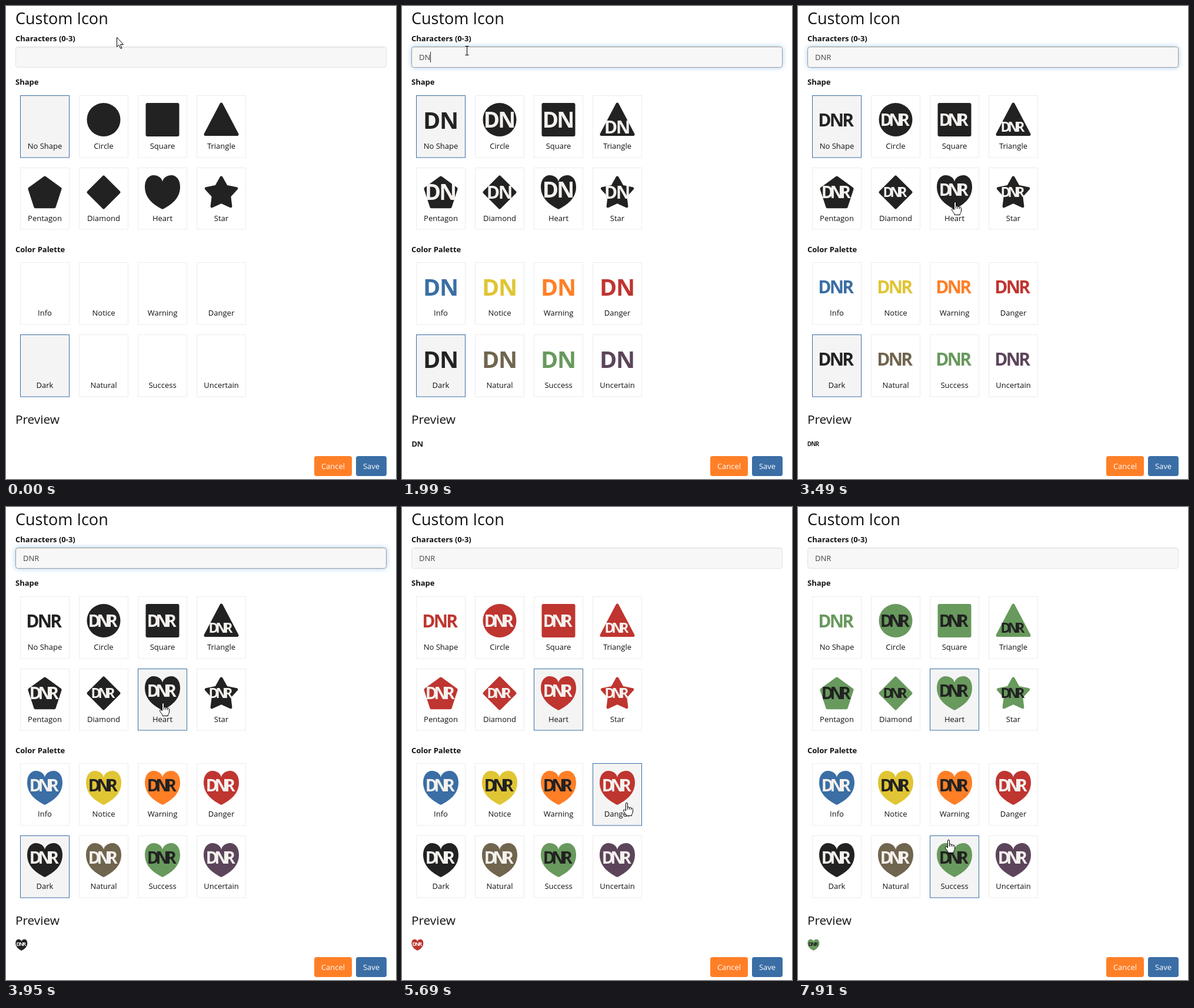
Write an HTML page that moves like this. It is 663x805 px and loops after 8 s.

```html
<!DOCTYPE html>
<html lang="en">
<head>
<meta charset="utf-8">
<title>Custom Icon</title>
<style>
  html, body { margin: 0; width: 100%; height: 100%; overflow: hidden; background: #fff; }
  svg { display: block; font: 13px "Open Sans", sans-serif; fill: #111; }
  .mid { text-anchor: middle; }
  .bold { font-weight: 700; }
</style>
</head>
<body>
<svg width="663" height="805" viewBox="0 0 663 805">
  <g id="scene"></g>
  <g id="cursor" stroke="#000" fill="#fff"></g>
</svg>
<script>
const LOOP = 8000;

// Regular polygon, or a star when the inner radius differs; corners rounded by the stroke.
function polygon(count, radius, inner, cy) {
  const points = [];
  for (let i = 0; i < count * 2; i++) {
    if (i % 2 && !inner) continue;
    const a = i * Math.PI / count, r = i % 2 ? inner : radius;
    points.push((r * Math.sin(a)).toFixed(2) + "," + (cy - r * Math.cos(a)).toFixed(2));
  }
  return rounded(points.join(" "));
}
const rounded = points => `<polygon points="${points}" stroke-width="5" stroke-linejoin="round"/>`;

const shapes = [
  { name: "No Shape", art: "", size: 30, spacing: -2.7, dy: 0.5 },
  { name: "Circle", art: '<circle cy="-.5" r="28.5" stroke="none"/>', size: 28, spacing: -6, dy: 0 },
  { name: "Square", art: '<rect x="-28.5" y="-29" width="57" height="57" rx="3" stroke="none"/>', size: 28, spacing: -6, dy: 0 },
  { name: "Triangle", art: rounded("0,-27 27,24.5 -27,24.5"), size: 23, spacing: -5, dy: 12 },
  { name: "Pentagon", art: polygon(5, 27.5, 0, 2.5), size: 28, spacing: -6, dy: 0 },
  { name: "Diamond", art: polygon(4, 26, 0, 0), size: 23, spacing: -5, dy: 0 },
  { name: "Heart", art: '<path d="M0 29C-14 22-30 11-30-9C-30-21-24-29-15-29C-7-29-1-24 0-18C1-24 7-29 15-29C24-29 30-21 30-9C30 11 14 22 0 29Z" stroke="none"/>', size: 28, spacing: -6, dy: -4 },
  { name: "Star", art: polygon(5, 27, 14.5, 2), size: 23, spacing: -5, dy: 0 }
];

const LIGHT = "#f4f1ee", DARK = "#222";
const colors = [
  { name: "Info", fill: "#3a6ea5", ink: LIGHT },
  { name: "Notice", fill: "#e0c534", ink: DARK },
  { name: "Warning", fill: "#ff7f27", ink: DARK },
  { name: "Danger", fill: "#bf3530", ink: LIGHT },
  { name: "Dark", fill: DARK, ink: LIGHT },
  { name: "Natural", fill: "#70654e", ink: LIGHT },
  { name: "Success", fill: "#68995d", ink: DARK },
  { name: "Uncertain", fill: "#5c455a", ink: LIGHT }
];

const shapeTops = [152, 275], colorTops = [436, 559];
const place = (i, tops) => ({ x: 24 + 100 * (i % 4), y: tops[i >> 2], h: tops[i >> 2] === 275 ? 105 : 106 });
const cards = [...shapes.map((_, i) => place(i, shapeTops)), ...colors.map((_, i) => place(i, colorTops))];

const label = (x, y, text, attrs = "") => `<text x="${x}" y="${y}" ${attrs}>${text}</text>`;

function icon(shape, color, text, x, y, scale = 1) {
  const n = text.length;
  const size = shape.size * [1, 1.53, 1.32, 1][n];
  const spacing = n === 3 ? shape.spacing : n === 2 ? shape.spacing / 2 : 0;
  const tx = spacing / 2 - (n === 3 ? size * 0.045 : 0);
  const ink = shape.art ? color.ink : color.fill;
  return `<g transform="translate(${x} ${y}) scale(${scale})">
    <g fill="${color.fill}" stroke="${color.fill}">${shape.art}</g>
    ${label(tx, shape.dy + size * 0.357, text, `class="mid bold" fill="${ink}" font-size="${size}" letter-spacing="${spacing}"`)}</g>`;
}

function card(box, name, selected, art) {
  return `<rect x="${box.x + .5}" y="${box.y + .5}" width="83" height="${box.h - .5}"
    fill="${selected ? "#f4f4f4" : "#fff"}" stroke="${selected ? "#3a6ea5" : "#ececec"}"/>
    ${art}${label(box.x + 42, box.y + 91, name, 'class="mid"')}`;
}

function button(x, width, fill, text) {
  return `<rect x="${x}" y="766" width="${width}" height="34" rx="4" fill="${fill}"/>` +
    label(x + width / 2, 788, text, 'class="mid" fill="#fff"');
}

function field(text, focus, caret) {
  const border = 225 - 69 * focus;
  const caretX = 29.5 + [0, 9.5, 19, 27][text.length];
  return `<rect x="16.5" y="69.5" width="630" height="35" rx="4" fill="#f7f7f7"
      stroke="rgb(${border},${border},${border})"
      style="filter:drop-shadow(0 0 4px rgba(102,175,233,${0.6 * focus}))"/>
    <path d="M19 70.5H644" stroke="#000" stroke-opacity=".05"/>
    ${label(29, 92, text, 'fill="#444"')}
    ${caret ? `<path d="M${caretX} 78V96" stroke="#222"/>` : ""}`;
}

function draw({ text, focus, caret, shape, color }) {
  const current = shapes[shape], tint = colors[color];
  const art = (box, s, c) => icon(s, c, text, box.x + 42, box.y + 42);
  return label(16, 31, "Custom Icon", 'font-size="27"') +
    label(16, 60, "Characters (0-3)", 'class="bold"') +
    field(text, focus, caret) +
    label(16, 134, "Shape", 'class="bold"') +
    shapes.map((s, i) => card(cards[i], s.name, i === shape, art(cards[i], s, tint))).join("") +
    label(16, 419, "Color Palette", 'class="bold"') +
    colors.map((c, i) => card(cards[i + 8], c.name, i === color, art(cards[i + 8], current, c))).join("") +
    label(16, 711, "Preview", 'font-size="20.8"') +
    icon(current, tint, text, 26.3, 745.3, 1 / 3) +
    button(524, 64, "#ff7f27", "Cancel") + button(595, 52, "#3a6ea5", "Save");
}

// Value of the last [time, value] entry already reached.
const at = (t, track) => track.reduce((value, [time, next]) => t >= time ? next : value, track[0][1]);

const stateAt = t => ({
  text: "DNR".slice(0, at(t, [[0, 0], [1760, 1], [1990, 2], [2160, 3]])),
  focus: at(t, [[0, 0], [1330, .5], [1390, 1], [4030, .5], [4110, 0]]),
  caret: at(t, [[0, 0], [1330, 1], [2300, 0], [2850, 1], [3400, 0], [3800, 1], [3950, 0]]),
  shape: at(t, [[0, 0], [3950, 6]]),
  color: at(t, [[0, 4], [5690, 3], [7530, 6]])
});

// Pointer moves: start, end, steps, target x, target y.
const moves = [
  [580, 790, 4, 110, 76],
  [2930, 3490, 9, 267, 333],
  [4400, 4560, 3, 294, 390],
  [4640, 5140, 8, 382, 503],
  [6550, 7050, 8, 260, 594],
  [7910, 7910, 1, 256, 566]
];

function pointerAt(t) {
  let x = 188, y = 53;
  for (const [start, end, steps, toX, toY] of moves) {
    if (t < start) break;
    const p = Math.min(1, (Math.floor((t - start) / (end - start || 1) * (steps - 1)) + 1) / steps);
    x += (toX - x) * p;
    y += (toY - y) * p;
  }
  return [Math.round(x), Math.round(y)];
}

const pointers = {
  arrow: '<path d="M.5 .5V16.5L4 13.2L6.6 19H9L6.6 12.5H11.5Z"/>',
  beam: '<path d="M-2.5-7.5H3.5M.5-7.5V7.5M-2.5 7.5H3.5" fill="none"/>',
  hand: `<path d="M-1.5 14V2Q-1.5 .5 0 .5T1.5 2V8Q3.2 6.6 4.5 8.5Q6.2 7.4 7.5 9.5Q10.5 8.6 10.5 12V16
    Q10.2 18.5 8.5 20.5V22.5H-1V20.5Q-3.5 18-5.5 14.2Q-5.8 11.5-3.5 12Z"/>
    <path d="M1.5 8V12M4.5 8.5V12M7.5 9.5V12.5" fill="none"/>`
};

function pointerKind(x, y) {
  const inside = (bx, by, w, h) => x >= bx && x < bx + w && y >= by && y < by + h;
  if (inside(16, 69, 631, 36)) return "beam";
  return cards.some(c => inside(c.x, c.y, 84, c.h)) ? "hand" : "arrow";
}

const scene = document.getElementById("scene");
const cursor = document.getElementById("cursor");
let shownState, shownKind;

function render() {
  const t = performance.now() % LOOP;
  const state = stateAt(t), key = JSON.stringify(state);
  if (key !== shownState) {
    scene.innerHTML = draw(state);
    shownState = key;
  }
  const [x, y] = pointerAt(t), kind = pointerKind(x, y);
  if (kind !== shownKind) {
    cursor.innerHTML = pointers[kind];
    shownKind = kind;
  }
  cursor.setAttribute("transform", `translate(${x} ${y})`);
  requestAnimationFrame(render);
}
render();
</script>
</body>
</html>
```
